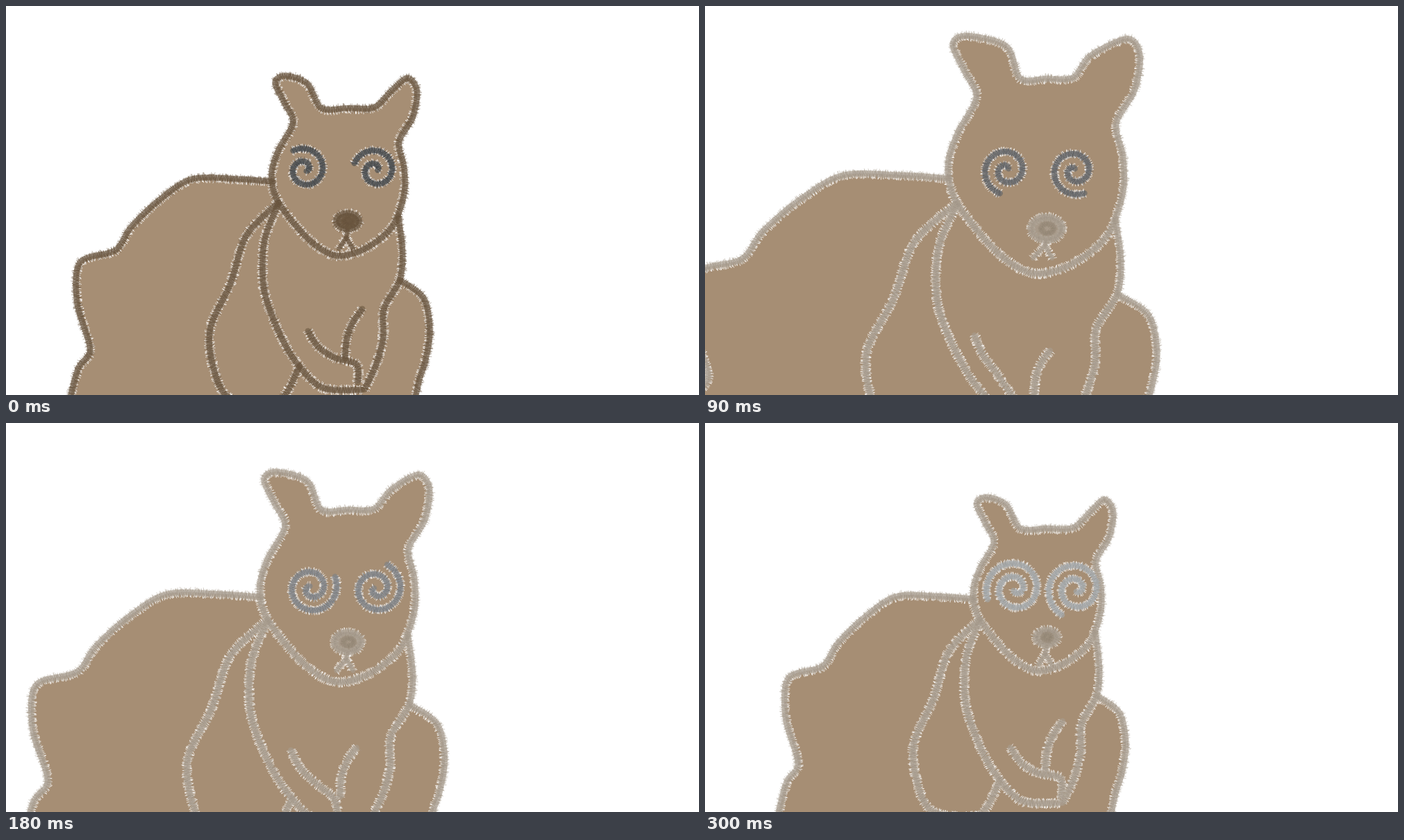
An HTML page with a canvas that plays this animation: 998x561 px, repeating every 0.33 s.

```html
<!DOCTYPE html>
<html lang="en">
<head>
<meta charset="utf-8">
<title>Fuzzy animal</title>
<style>
html, body { margin: 0; width: 100%; height: 100%; overflow: hidden; background: #fff; }
canvas { display: block; width: 998px; height: 561px; }
</style>
</head>
<body>
<canvas id="stage" width="998" height="561"></canvas>
<script>
const W = 998, H = 561, STEP = 30, LOOP = 330, PEAK = 90, END = 300;
const FUR = '#a68e74', DARK = [108, 87, 64], LIGHT = [169, 157, 143];
const CX = 484, CY = 280; // centre of the zoom
const SUB = 10;

// The resting pose as x,y pairs; the zoom makes all the others from it.
const face = [575,110, 588,128, 582,165, 563,199, 570,234, 570,272, 553,318, 515,348, 475,357,
  437,334, 395,282, 386,244, 396,210, 416,172, 404,145, 391,116, 406,107];
const crown = [434,118, 454,152, 492,152, 530,151, 555,128];
const body = {
  back: [388,254, 338,250, 276,250, 231,279, 191,318, 169,351, 120,368, 116,425, 134,491, 117,519, 102,580],
  arm: [396,283, 351,330, 329,398, 301,461, 305,516, 328,560, 395,565, 425,514],
  chestL: [396,284, 376,338, 375,403, 393,459, 418,506, 456,545, 512,548],
  chestR: [562,302, 568,353, 564,393, 542,434, 541,475, 531,513, 515,548],
  leg: [564,393, 597,418, 606,463, 600,506, 591,535, 580,590]
};
const paws = [
  { rest: [440,468, 455,490, 480,505, 512,512, 513,540], big: [388,475, 400,503, 420,530, 442,562, 450,575] },
  { rest: [515,430, 500,452, 492,476, 490,502], big: [497,497, 485,513, 476,537, 474,568] }
];

let seed = 1;
function rnd() {
  seed = (seed + 0x6D2B79F5) | 0;
  let t = Math.imul(seed ^ (seed >>> 15), 1 | seed);
  t = (t + Math.imul(t ^ (t >>> 7), 61 | t)) ^ t;
  return ((t ^ (t >>> 14)) >>> 0) / 4294967296;
}

const mix = (a, b, k) => a.map((v, i) => v + (b[i] - v) * k);
const zoom = (flat, zx, zy) => flat.map((v, i) => i % 2 ? CY + (v - CY) * zy : CX + (v - CX) * zx);
// Swells quickly, then sinks back evenly.
const swell = t => t < PEAK ? 0.1 + 0.9 * t / PEAK : (END - t) / (END - PEAK);

// Smooth curve through flat x,y pairs.
function curve(flat, closed) {
  const n = flat.length / 2, pts = [], last = closed ? n : n - 1;
  const at = i => {
    i = closed ? (i + n) % n : Math.min(n - 1, Math.max(0, i));
    return [flat[2 * i], flat[2 * i + 1]];
  };
  for (let i = 0; i < last; i++) {
    const [p, a, b, q] = [at(i - 1), at(i), at(i + 1), at(i + 2)];
    for (let s = 0; s < SUB; s++) {
      const u = s / SUB, v = u * u, w = v * u;
      pts.push([0, 1].map(d =>
        a[d] * (2 * w - 3 * v + 1) + b[d] * (3 * v - 2 * w) +
        0.45 * ((b[d] - p[d]) * (w - 2 * v + u) + (q[d] - a[d]) * (w - v))));
    }
  }
  pts.push(at(last));
  return pts;
}

// Winds clockwise from the loose outer end to the middle.
function spiral(x, y, r, end, turns) {
  const pts = [], n = 70;
  for (let i = 0; i <= n; i++) {
    const k = i / n, a = (end + 360 * turns * k) * Math.PI / 180;
    const d = 3 + (r - 3) * Math.pow(1 - k, 0.85);
    pts.push([x + d * Math.cos(a), y + d * Math.sin(a)]);
  }
  return pts;
}

function ring(x, y, rx, ry) {
  const pts = [];
  for (let i = 0; i <= 36; i++) {
    const a = i * Math.PI / 18;
    pts.push([x + rx * Math.cos(a), y + ry * Math.sin(a)]);
  }
  return pts;
}

function trace(c, pts) {
  c.beginPath();
  pts.forEach(([x, y]) => c.lineTo(x, y));
}

function fill(c, pts, color) {
  trace(c, pts);
  c.fillStyle = color;
  c.fill();
}

// Short crosswise hairs along a line, half length between lo and hi.
function hairs(c, pts, gap, lo, hi) {
  const len = () => lo + (hi - lo) * rnd();
  let left = 0;
  c.beginPath();
  for (let i = 1; i < pts.length; i++) {
    const [x0, y0] = pts[i - 1], dx = pts[i][0] - x0, dy = pts[i][1] - y0;
    const d = Math.hypot(dx, dy);
    if (!d) continue;
    for (; left < d; left += gap * (0.5 + rnd())) {
      const x = x0 + dx * left / d, y = y0 + dy * left / d;
      const a = Math.atan2(dy, dx) + Math.PI / 2 + (rnd() - 0.5) * 0.9;
      const p = len(), q = len(), cx = Math.cos(a), cy = Math.sin(a);
      c.moveTo(x - cx * p, y - cy * p);
      c.lineTo(x + cx * q, y + cy * q);
    }
    left -= d;
  }
  c.stroke();
}

const rgb = (ink, k = 1) => `rgb(${ink.map(v => Math.round(v * k))})`;

function halo(c, pts, w) {
  c.strokeStyle = '#fff';
  c.globalAlpha = 0.75;
  c.lineWidth = 1;
  hairs(c, pts, 1.3, w * 0.9, w * 1.4);
}

function fuzz(c, pts, ink, w) {
  c.lineCap = c.lineJoin = 'round';
  c.strokeStyle = rgb(ink);
  c.globalAlpha = 0.6;
  c.lineWidth = w * 1.4;
  trace(c, pts);
  c.stroke();
  c.lineCap = 'butt';
  c.globalAlpha = 0.5;
  c.lineWidth = 0.9;
  hairs(c, pts, 1.6, w * 0.6, w * 1.35);
  hairs(c, pts, 1.3, w * 0.6, w * 1.05);
  c.strokeStyle = rgb(ink, 0.88);
  c.globalAlpha = 0.4;
  hairs(c, pts, 1.6, w * 0.1, w * 0.75);
}

function paint(t) {
  const cv = document.createElement('canvas');
  cv.width = W;
  cv.height = H;
  const c = cv.getContext('2d');
  const s = swell(t), u = t / END, z = 1 + 0.37 * s;
  const ink = mix(DARK, LIGHT, Math.min(1, t / 60));
  const eyeInk = [66, 70, 74].map(v => v + 98 * u);
  seed = 101 + t;
  c.fillStyle = '#fff';
  c.fillRect(0, 0, W, H);

  const line = {};
  for (const k in body) line[k] = curve(zoom(body[k], z, 1 + 0.2 * s));
  const head = curve([...zoom(face, z, z), ...zoom(crown, 1, z)], true);
  const side = line.chestR.slice(0, 2 * SUB + 1);
  fill(c, [...line.back, ...line.leg.slice().reverse(), ...side.reverse()], FUR);
  fill(c, head, FUR);

  const nx = 492, ny = 309 + 12 * s, rx = 16 + 7 * s, ry = 11 + 6 * s;
  const nose = ring(nx, ny, rx, ry);
  const apex = [490, 333 + 12 * s], lip = 349 + 15 * s;
  const mouth = [[[nx, ny + ry], apex, [480 - 8 * s, lip]], [apex, [500, lip]]];
  const winding = 1.45 + 0.45 * u, radius = 32 + 10 * u, turn = 440 * u;
  const eyes = [
    spiral(430 + 16 * u, 236 + 3 * u, radius, -122 - turn, winding),
    spiral(532 + 2 * u, 237 + 3 * u, radius, -162 - turn, winding)
  ];
  const outlines = [...Object.values(line), ...paws.map(p => curve(mix(p.rest, p.big, s))), head];

  outlines.forEach(l => halo(c, l, 6));
  [nose, ...mouth, ...eyes].forEach(l => halo(c, l, 5.4));
  outlines.forEach(l => fuzz(c, l, ink, 6));
  c.globalAlpha = 0.85;
  fill(c, nose, rgb(ink));
  fuzz(c, nose, ink, 6);
  fuzz(c, ring(nx + 1, ny, rx * 0.4, ry * 0.4), mix(ink, DARK, 0.25), 5);
  mouth.forEach(l => fuzz(c, l, ink, 4.4));
  eyes.forEach(l => fuzz(c, l, eyeInk, 5.4));
  return cv;
}

const cels = [];
for (let t = 0; t < LOOP; t += STEP) cels.push(paint(t));

const stage = document.getElementById('stage').getContext('2d');
function draw() {
  stage.drawImage(cels[Math.floor(performance.now() % LOOP / STEP)], 0, 0);
  requestAnimationFrame(draw);
}
draw();
</script>
</body>
</html>
```
